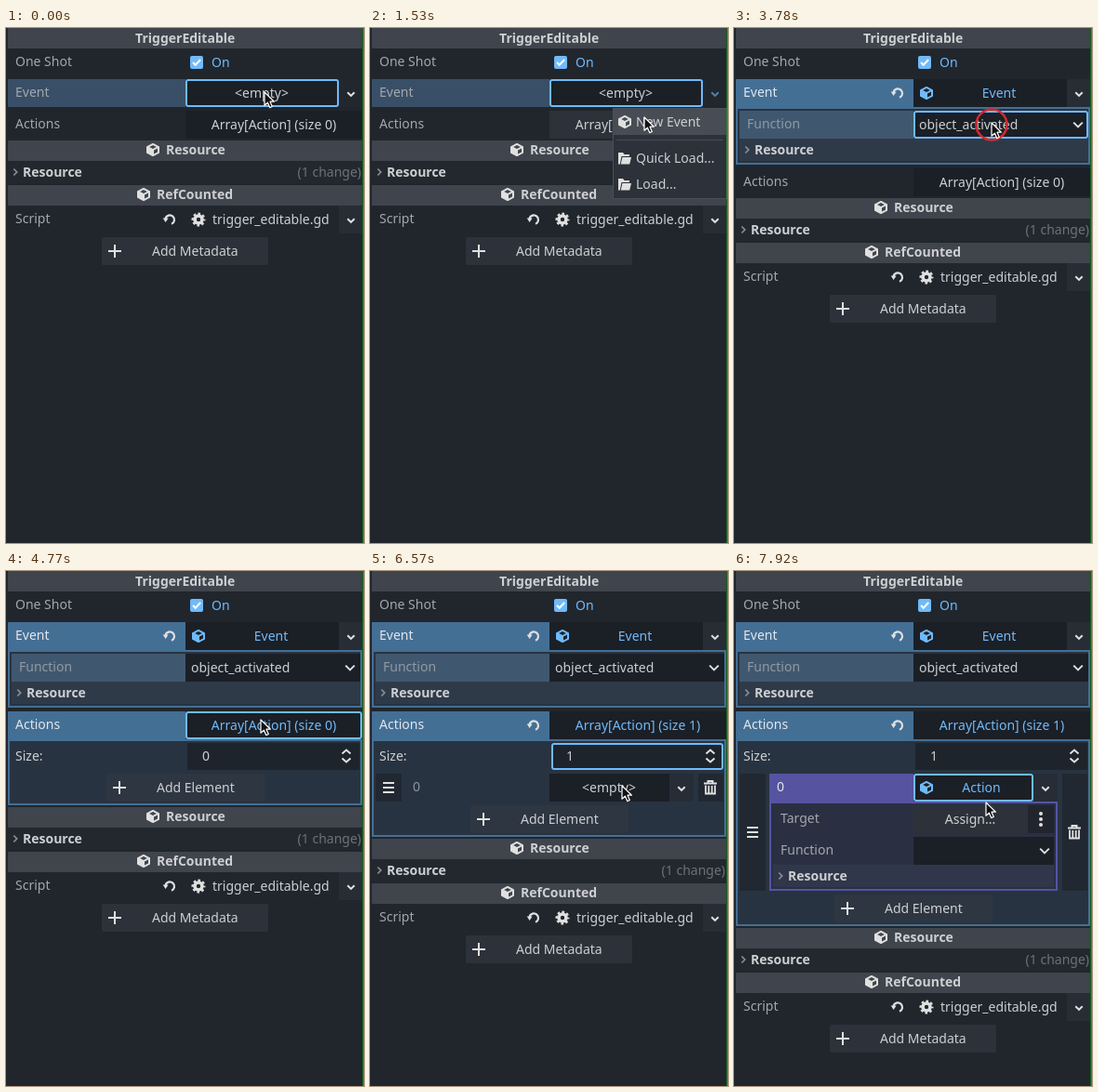
Animation of 385 by 554 pixels, one loop 8000 ms. Source, as an HTML page:

```html
<!DOCTYPE html>
<html lang="en">
<head>
<meta charset="utf-8">
<title>Inspector</title>
<style>
  html, body { margin: 0; width: 100%; height: 100%; overflow: hidden; background: #21262d; }
  svg { display: block; width: 385px; height: 554px; }
  text { font: 14px "Noto Sans", "Open Sans", sans-serif; white-space: pre; }
  .b { font-weight: 700; }
</style>
</head>
<body>
<svg viewBox="0 0 385 554">
  <g id="scene"></g>
  <circle id="ring" r="16.5" fill="none" stroke="#cf2b2f" stroke-width="2.6"/>
  <path id="cursor" d="M0 0V14.2L3.4 11.2L5.7 16.6L8.3 15.5L6 10.2H10.4Z" fill="#111" stroke="#fff" stroke-width="1.2" stroke-linejoin="round"/>
  <rect x="383.6" width="1.4" height="554" fill="#00b400"/>
</svg>
<script>
const LOOP = 8000, STEP = 90;
const C = {
  bg: '#21262d', head: '#40444c', section: '#23282f', field: '#1b1f26', hover: '#2d323a', soft: '#282d35', add: '#2d323a',
  label: '#a3a7ac', text: '#cdcfd2', icon: '#e0e0e0', bright: '#e3e6ea', dim: '#6d7178', blue: '#70bafa',
  pick: '#394f67', open: '#446f95', sub: '#283341', subSection: '#2f3a49', subPick: '#40586f',
  violet: '#5653a0', violetSub: '#2a3042', violetSection: '#31374a'
};

// Pointer way points: time, x, y of the tip
const PATH = [
  [0, 278, 69], [450, 278, 69], [990, 293, 95], [1530, 295, 96], [1800, 295, 96],
  [2250, 278, 99], [2610, 278, 100], [2790, 279, 106], [3150, 279, 106], [3600, 277, 102],
  [3870, 277, 102], [4500, 274, 160], [4770, 274, 160], [5310, 366, 194], [5670, 366, 194],
  [6570, 271, 231], [6840, 271, 231], [7110, 271, 262], [7470, 271, 262], [7920, 271, 249], [8000, 271, 249]
];
const CLICKS = [270, 1620, 2430, 3780, 4590, 5490, 6750, 7200];
const HOLD = 180;

const rect = (x, y, w, h, fill, r = 0) => `<rect x="${x}" y="${y}" width="${w}" height="${h}" rx="${r}" fill="${fill}"/>`;
const frame = (x, y, w, h, color = C.blue, r = 2) =>
  `<rect x="${x + 1}" y="${y + 1}" width="${w - 2}" height="${h - 2}" rx="${r}" fill="none" stroke="${color}" stroke-width="2"/>`;
const text = (x, y, s, fill = C.text, anchor = 'start', cls = '') =>
  `<text x="${x}" y="${y}" fill="${fill}" text-anchor="${anchor}" class="${cls}">${s.replace(/</g, '&lt;')}</text>`;
const mid = (x, y, s, fill) => text(x, y, s, fill, 'middle');
const bold = (x, y, s) => text(x, y, s, C.text, 'start', 'b');
const line = (x, y, d, color = C.icon, w = 2) =>
  `<path transform="translate(${x} ${y})" d="${d}" fill="none" stroke="${color}" stroke-width="${w}"/>`;
const solid = (x, y, d, color = C.icon) =>
  `<path transform="translate(${x} ${y})" d="${d}" fill="${color}" fill-rule="evenodd"/>`;
const down = (x, y, color) => line(x, y, 'M-3.7-1.8L0 1.9L3.7-1.8', color);
const wideDown = (x, y) => line(x, y, 'M-4.8-2.4L0 2.4L4.8-2.4');
const right = (x, y) => line(x, y, 'M-1.7-3.5L1.7 0L-1.7 3.5', '#8a8e94', 1.7);
const plus = (x, y) => line(x, y, 'M-7 0H7M0-7V7');

// Box with open top and right faces
const cube = (x, y, color) =>
  solid(x, y, 'M-.5-6.9H.5L7-3.6V3.6L.5 6.9H-.5L-7 3.6V-3.6Z M0-4.9L3.8-3L0-1.1L-3.8-3Z M5-1.4V2.4L1 4.4V.6Z', color);
const revert = (x, y) =>
  line(x, y, 'M-4.6-1A4.9 4.9 0 1 1 2 4.8', C.icon, 2.2) + solid(x, y, 'M-7.3-1.4H-1.4L-4.4 3Z');
const folder = (x, y) =>
  solid(x, y, 'M-7 6.5V-6H-2L-.5-4H5V-2H-3.5L-5.2 6.5Z M-2.6-1H7L5.2 6.5H-4.3Z');
const trash = (x, y) =>
  line(x, y, 'M-7-4.5H7M-2.5-5V-7H2.5V-5') + line(x, y, 'M-5-2.5V6.5H5V-2.5M-1.7-2V6M1.7-2V6', C.icon, 1.8);

function gear(x, y) {
  return `<g transform="translate(${x} ${y})" fill="none" stroke="${C.icon}"><circle r="4" stroke-width="3.6"/>
    <circle r="6.3" stroke-width="2.4" stroke-dasharray="2.6 2.348" stroke-dashoffset="1.3"/></g>`;
}

function header(y, s, x, icon) {
  const title = icon ? cube(icon, y + 10) + bold(x, y + 15, s) : bold(x, y + 16, s);
  return rect(2, y, 381, 22, C.head) + title;
}
const section = (x, y, w, s, fill) => rect(x, y - 12, w, 24, fill) + right(x + 8, y) + bold(x + 16, y + 5, s);
const addButton = (x, y, w, h, s, fill) =>
  rect(x, y - h / 2, w, h, fill, 2) + plus(x + 14, y) + text(x + 54, y + 5, s);

function menu(right, y, first) {
  const x = right - 123;
  return rect(x, y, 123, 98, '#4a4f59') + rect(x + 1, y + 1, 121, 96, '#2c313a') +
    rect(x + 1, y + 1, 121, 28, '#484c54') + cube(x + 13, y + 15) +
    text(x + 25, y + 20, first) + rect(x + 4, y + 34, 115, 1, '#474c55') +
    folder(x + 13, y + 54) + text(x + 25, y + 59, 'Quick Load...') +
    folder(x + 13, y + 82) + text(x + 25, y + 87, 'Load...');
}

function eventBlock(s) {
  let out = rect(2, 55, 191, 30, s.event ? C.open : C.pick) + text(10, 74, 'Event', s.event ? C.bright : C.label);
  out += rect(193, 55, 165, 30, C.field) + rect(358, 55, 25, 30, s.event ? C.soft : '#22272e') +
    down(371, 71, s.menu === 1 ? '#4f83b0' : C.icon);
  if (!s.event) out += mid(275, 75, '<empty>');
  else {
    out += revert(176, 70) + cube(207, 70, C.blue) + mid(285, 75, 'Event', C.blue);
    out += rect(2, 85, 381, 62, C.sub) + frame(2, 85, 381, 62, C.open, 0);
    if (s.picked) out += rect(6, 89, 187, 30, C.subPick);
    out += text(14, 108, 'Function', '#9099a3') + rect(193, 89, 188, 30, C.field) +
      text(199, 109, 'object_activated') + wideDown(370, 104) + section(6, 131, 375, 'Resource', C.subSection);
  }
  if (s.focus === 'event') out += frame(193, 55, 165, 30);
  if (s.focus === 'function') out += frame(193, 89, 188, 30);
  return out;
}

function element(s) {
  const h = s.action ? 126 : 30, cy = 218 + h / 2;
  let out = rect(6, 218, 28, h, '#212831') + rect(353, 218, 27, h, '#212831');
  out += line(20, cy, 'M-6-5H6M-6 0H6M-6 5H6') + trash(366, cy);
  if (s.action) out += rect(38, 218, 155, 30, C.violet);
  out += text(46, 237, '0', s.action ? C.bright : '#8d959e') + rect(193, 218, 129, 30, C.field) +
    rect(322, 218, 26, 30, '#262d37') + down(335, 234, s.menu === 2 ? '#4f83b0' : C.icon);
  if (!s.action) out += mid(257, 238, '<empty>');
  else {
    out += cube(207, 233, C.blue) + mid(266, 238, 'Action', C.blue);
    out += rect(38, 248, 310, 96, C.violetSub) + frame(38, 248, 310, 96, C.violet, 0);
    out += text(50, 271, 'Target', C.label) + rect(193, 252, 122, 30, s.hover ? C.hover : C.field) +
      mid(254, 272, 'Assign...') + rect(316, 252, 28, 30, '#20252e');
    for (const dy of [-6, 0, 6]) out += `<circle cx="330" cy="${267 + dy}" r="2" fill="${C.icon}"/>`;
    out += text(50, 305, 'Function', C.label) + rect(193, 286, 151, 30, C.field) + wideDown(334, 301) +
      section(42, 328, 302, 'Resource', C.violetSection);
  }
  if (s.focus === 'action') out += frame(193, 218, 129, 30);
  return out;
}

function actionsBlock(s, y) {
  const label = s.actions ? C.open : s.focus === 'array' ? C.pick : 'none';
  let out = rect(2, y, 191, 30, label) + text(10, y + 19, 'Actions', s.actions ? C.bright : C.label) +
    rect(193, y, 190, 30, s.hover && !s.actions ? C.hover : C.field) +
    mid(288, y + 20, `Array[Action] (size ${s.size})`, s.actions ? C.blue : C.text);
  if (s.actions) {
    const grow = s.size * 34 + (s.action ? 96 : 0);
    out += rect(2, 181, 381, 71 + grow, C.sub) + frame(2, 181, 381, 71 + grow, C.open, 0);
    out += text(10, 204, 'Size:') + rect(195, 185, 185, 29, '#1e242c') + text(211, 204, String(s.size)) +
      line(366, 199, 'M-4.5-2.5L0-6.5L4.5-2.5M-4.5 2.5L0 6.5L4.5 2.5');
    if (s.size) out += revert(176, 166) + element(s);
    out += addButton(108, 233 + grow, 170, 30, 'Add Element', '#2d3641');
    if (s.focus === 'size') out += frame(195, 185, 185, 29);
  }
  if (s.focus === 'array') out += frame(193, y, 190, 30);
  return out;
}

function draw(s) {
  const shift = s.event ? 62 : 0;
  const d = shift + (s.actions ? 71 : 0) + s.size * 34 + (s.action ? 96 : 0);
  let out = rect(0, 0, 385, 554, C.bg) + header(0, 'TriggerEditable', 139);
  out += text(10, 41, 'One Shot', C.label) + rect(198, 30, 14, 14, C.blue, 2) +
    line(205, 37, 'M-4 0L-1.3 2.8L4.2-3', '#fff') + text(221, 42, 'On', C.blue);
  out += eventBlock(s) + actionsBlock(s, 89 + shift);
  out += header(121 + d, 'Resource', 172, 158) + section(2, 155 + d, 381, 'Resource', C.section) +
    text(382, 160 + d, '(1 change)', C.dim, 'end');
  out += header(169 + d, 'RefCounted', 162, 148) + text(10, 210 + d, 'Script', C.label) +
    revert(176, 206 + d) + gear(207, 206 + d) + text(222, 211 + d, 'trigger_editable.gd') +
    rect(358, 191 + d, 25, 30, C.soft) + down(371, 207 + d);
  out += addButton(103, 240 + d, 179, 30, 'Add Metadata', C.add);
  if (s.menu === 1) out += menu(384, 86, 'New Event');
  if (s.menu === 2) out += menu(349, 249, 'New Action');
  return out;
}

function stateAt(t, y) {
  const focus = [[0, 'event'], [2430, 'function'], [4590, 'array'], [5490, 'size'], [6750, 'action']];
  const s = {
    focus: focus.filter(f => f[0] <= t).pop()[1],
    menu: t >= 450 && t < 1800 ? 1 : t >= 6930 && t < 7380 ? 2 : 0,
    event: t >= 1800,
    picked: t >= 2430,
    actions: t >= 4680,
    size: t >= 5580 ? 1 : 0,
    action: t >= 7380
  };
  // The pointer lights the closed Actions button, later the Assign button
  const top = s.action ? 248 : s.event ? 151 : 89;
  s.hover = y >= top && y < top + 30;
  return s;
}

function pointer(t) {
  const i = Math.max(1, PATH.findIndex(p => p[0] >= t));
  const [a, x, y] = PATH[i - 1], [b, u, v] = PATH[i];
  const k = (t - a) / (b - a), e = k * k * (3 - 2 * k);
  return [x + (u - x) * e, y + (v - y) * e];
}

const [scene, ring, cursor] = ['scene', 'ring', 'cursor'].map(id => document.getElementById(id));
let shown = '';

function render(now) {
  const t = Math.floor((now % LOOP) / STEP) * STEP;
  const [x, y] = pointer(t);
  const s = stateAt(t, y), key = JSON.stringify(s);
  if (key !== shown) {
    scene.innerHTML = draw(s);
    shown = key;
  }
  cursor.setAttribute('transform', `translate(${x.toFixed(1)} ${y.toFixed(1)})`);
  ring.setAttribute('transform', `translate(${x} ${y + 2})`);
  ring.style.display = CLICKS.some(c => t >= c && t < c + HOLD) ? '' : 'none';
}

const start = performance.now();
function tick() {
  render(performance.now() - start);
  requestAnimationFrame(tick);
}
tick();
</script>
</body>
</html>
```
